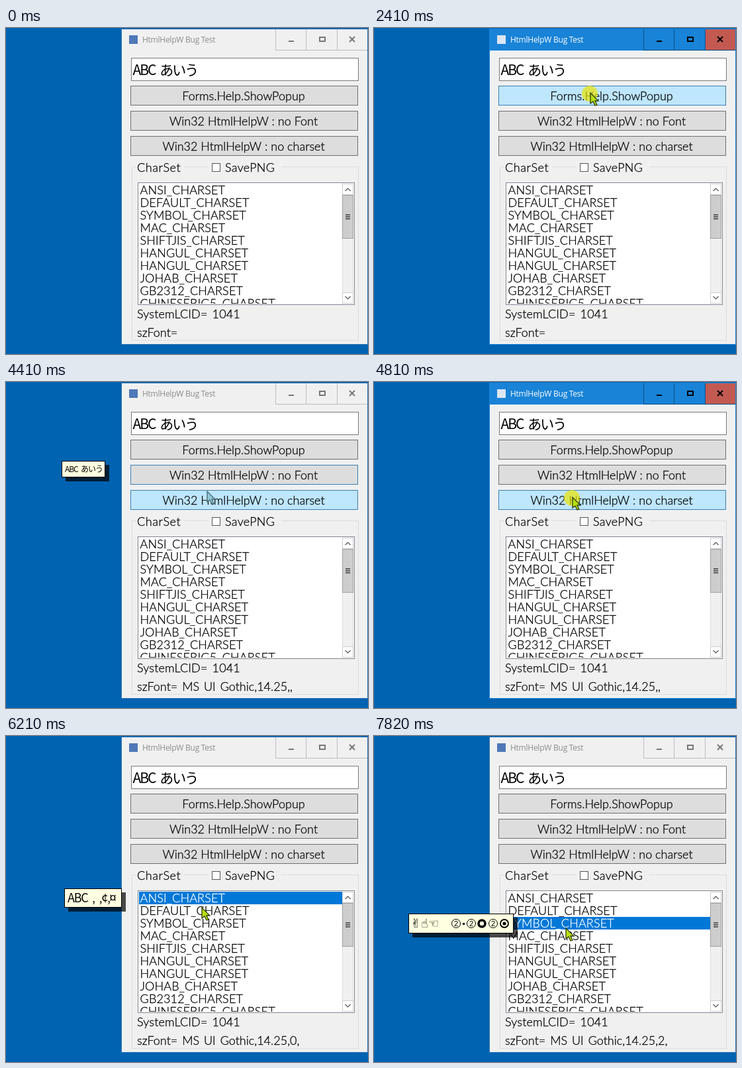
An HTML page with a canvas for the animation above (8 s loop, 547 by 492 pixels).

```html
<!DOCTYPE html>
<html lang="ja">
<head>
<meta charset="utf-8">
<title>HtmlHelpW Bug Test</title>
<style>
html, body { margin: 0; width: 100%; height: 100%; overflow: hidden; background: #0063b1 }
canvas { display: block }
</style>
</head>
<body>
<canvas id="stage" width="547" height="492"></canvas>
<script>
const ctx = document.getElementById('stage').getContext('2d');
const LOOP = 8000, TICK = 200;
const UI = '300 18px Lato, sans-serif';
const JP = size => `${size}px "Noto Sans CJK JP", "Noto Sans CJK", sans-serif`;
const SAMPLE = 'ABC あいう';
const CHARSETS = ['ANSI', 'DEFAULT', 'SYMBOL', 'MAC', 'SHIFTJIS', 'HANGUL', 'HANGUL', 'JOHAB', 'GB2312', 'CHINESEBIG5'];
const BUTTONS = ['Forms.Help.ShowPopup', 'Win32 HtmlHelpW : no Font', 'Win32 HtmlHelpW : no charset'];
const buttonY = i => 87 + 38 * i;
const rowY = i => 235 + 19 * i;

// Each click: its tick, its place, and the tick at which its popup opens
const CLICKS = [
  { at: 6, x: 314, y: 56, opens: Infinity },
  { at: 12, x: 327, y: 98, opens: 14, popup: () => smallPopup(187, buttonY(0) - 6) },
  { at: 18, x: 314, y: 138, opens: 18, popup: () => smallPopup(117, buttonY(1) - 6) },
  { at: 24, x: 300, y: 174, opens: 25, popup: () => largePopup(117.5, buttonY(2) - 6) },
  { at: 28, x: 298, y: 243, opens: 29, popup: () => largePopup(131.5, rowY(0) - 5, 'ABC ‚\u00a0‚¢‚¤', 87) },
  { at: 32, x: 296, y: 259, opens: 33, popup: () => largePopup(131.5, rowY(1) - 5) },
  { at: 38, x: 290, y: 290, opens: 38, popup: () => symbolPopup(131.5, rowY(2) - 5) }
];
const ENTRY = { at: 0, x: 424, y: 455 };
const FIRST_BUTTON = 1, FIRST_ROW = FIRST_BUTTON + BUTTONS.length;

function rect(x, y, w, h, fill, stroke) {
  ctx.fillStyle = fill;
  ctx.fillRect(x, y, w, h);
  if (stroke) {
    ctx.strokeStyle = stroke;
    ctx.lineWidth = 1;
    ctx.strokeRect(x + .5, y + .5, w - 1, h - 1);
  }
}

function line(color, width, ...pts) {
  ctx.strokeStyle = color;
  ctx.lineWidth = width;
  ctx.beginPath();
  pts.forEach(([x, y]) => ctx.lineTo(x, y));
  ctx.stroke();
}

function text(s, x, y, { font = UI, color = '#000', align = 'left', track = 0, gap = 0 } = {}) {
  ctx.font = font;
  ctx.fillStyle = ctx.strokeStyle = color;
  ctx.textAlign = align;
  ctx.letterSpacing = track + 'px';
  ctx.wordSpacing = gap + 'px';
  ctx.fillText(s, x, y);
  if (font === UI) {
    // Darken the thin interface strokes
    ctx.lineWidth = .3;
    ctx.strokeText(s, x, y);
  }
}

const checker = (() => {
  const tile = document.createElement('canvas');
  tile.width = tile.height = 2;
  const c = tile.getContext('2d');
  c.fillRect(0, 0, 1, 1);
  c.fillRect(1, 1, 1, 1);
  return ctx.createPattern(tile, 'repeat');
})();

function titleBar(active) {
  if (active) rect(175, 2, 371, 32, '#1883d7');
  rect(186, 11, 13, 13, active ? '#dce6f0' : '#4f78b8');
  text('HtmlHelpW Bug Test', 206, 22, { font: '12px "Open Sans", sans-serif', color: active ? '#fff' : '#8c8c8c', track: -.25 });
  const edge = active ? '#0b4f86' : '#bcbcbc', ink = active ? '#000' : '#777';
  if (active) rect(500, 2, 46, 31, '#c35a52');
  line(edge, 1, [407.5, 2], [407.5, 33.5], [546, 33.5]);
  for (const x of [453.5, 500.5]) line(edge, 1, [x, 2], [x, 33]);
  line(ink, 2, [427, 20], [435, 20]);
  ctx.strokeRect(474, 14, 8, 6);
  line(ink, 2, [519, 13], [527, 21]);
  line(ink, 2, [527, 13], [519, 21]);
}

function scrollBar() {
  rect(508, 235, 17, 181, '#f0f0f0', '#dcdcdc');
  rect(508, 235, 17, 17, '#fff', '#cdcdcd');
  rect(508, 399, 17, 17, '#fff', '#cdcdcd');
  rect(508, 252, 17, 66, '#cdcdcd', '#a0a0a0');
  for (let i = 0; i < 3; i++) rect(513, 281 + 3 * i, 7, 2, '#606060');
  for (const [y, dir] of [[244, 1], [407, -1]]) {
    line('#555', 1.2, [512.5, y + 2 * dir], [516.5, y - 2 * dir], [520.5, y + 2 * dir]);
  }
}

function listBox(selected) {
  rect(199, 233, 328, 185, '#fff', '#828790');
  ctx.save();
  ctx.beginPath();
  ctx.rect(201, 235, 307, 181);
  ctx.clip();
  CHARSETS.forEach((name, i) => {
    const on = i === selected;
    if (on) rect(201, rowY(i), 307, 19, '#0078d7');
    text(name + '_CHARSET', 202.5, rowY(i) + 16, { color: on ? '#fff' : '#000', track: .15 });
  });
  ctx.restore();
  scrollBar();
}

function formWindow(k, current, mouse) {
  const active = current >= 0 && k < CLICKS[current].opens;
  rect(174, 1, 373, 477, '#f0f0f0', active ? '#1883d7' : '#2a72b4');
  titleBar(active);

  const over = (y, h) => mouse && mouse.y >= y && mouse.y < y + h;
  rect(189, 45, 344, 35, '#fff', over(45, 35) ? '#2a9fd8' : '#7a7a7a');
  text(SAMPLE, 191.5, 71, { font: JP(21), track: -2, gap: 4 });

  BUTTONS.forEach((label, i) => {
    const y = buttonY(i), lit = over(y, 30), focused = i === current - FIRST_BUTTON;
    rect(188, y, 344, 30, lit ? '#bee6fd' : '#ddd', lit || focused ? '#3c7fb1' : '#707070');
    text(label, 359, y + 22, { align: 'center' });
  });

  ctx.strokeStyle = '#dcdcdc';
  ctx.lineWidth = 1;
  ctx.strokeRect(190.5, 209.5, 342, 262);
  rect(196, 203, 73, 14, '#f0f0f0');
  rect(305, 203, 111, 14, '#f0f0f0');
  text('CharSet', 198, 217, { track: .6 });
  rect(311, 204, 13, 13, '#fff', '#555');
  text('SavePNG', 331, 217, { track: .3 });

  listBox(current - FIRST_ROW);
  text('SystemLCID= 1041', 198, 438, { gap: 2, track: .15 });
  const shown = CLICKS.findLastIndex(c => c.opens <= k);
  const charset = shown >= FIRST_ROW ? shown - FIRST_ROW : '';
  const fontName = shown > FIRST_BUTTON ? ` MS UI Gothic,14.25,${charset},` : '';
  text('szFont=' + fontName, 198, 466, { gap: 2 });
}

function balloon(x, y, w, h) {
  rect(x + 6, y + 6, w, h, 'rgba(0,0,0,.4)');
  rect(x + 6, y + 6, w, h, checker);
  rect(x, y, w, h, '#ffffe1', '#000');
}

function smallPopup(cx, y) {
  const x = cx - 33;
  balloon(x, y, 66, 25);
  text(SAMPLE, x + 5, y + 17, { font: JP(12), track: -1.1, gap: 3 });
}

function largePopup(cx, y, s = SAMPLE, w = 97) {
  const x = Math.floor(cx - w / 2);
  balloon(x, y, w, 29);
  text(s, x + 5, y + 21, { font: '300 ' + JP(18), track: -1.3, gap: 4 });
}

function ring(x, y, r, width) {
  ctx.strokeStyle = '#000';
  ctx.lineWidth = width;
  ctx.beginPath();
  ctx.arc(x, y, r, 0, 7);
  ctx.stroke();
}

function symbolPopup(cx, y) {
  const x = cx - 79.5;
  balloon(x, y, 159, 30);
  const font = '18px "DejaVu Sans", sans-serif';
  [...'✌☝☜'].forEach((c, i) => text(c, x + 11 + 13.5 * i, y + 21, { font, align: 'center' }));
  for (const dx of [72, 95, 128]) {
    ring(x + dx, y + 15, 6.5, 1);
    text('2', x + dx, y + 19, { font: '11px "Liberation Sans", sans-serif', align: 'center' });
  }
  rect(x + 82, y + 14, 3, 3, '#000');
  ring(x + 111, y + 15, 5, 3.5);
  ring(x + 145, y + 15, 6, 1.8);
  ring(x + 145, y + 15, 1.3, 2.6);
}

// The pointer rests for a tick after a click and arrives a tick before the next
function pointerAt(k, current) {
  const from = CLICKS[current] || ENTRY, to = CLICKS[current + 1] || from;
  const start = from.at + 1, end = to.at - 1;
  const u = end > start ? Math.min(1, Math.max(0, (k - start) / (end - start))) : 0;
  const mix = (a, b) => Math.round(a + (b - a) * u);
  return { x: mix(from.x, to.x), y: mix(from.y, to.y) };
}

function iBeam(x, y) {
  for (const [color, width, d] of [['#111', 4, 1], ['#b4c800', 1.6, 0]]) {
    line(color, width, [x, y - 7 - d], [x, y + 7 + d]);
    for (const dy of [-7, 7]) line(color, width, [x - 4 - d, y + dy], [x + 4 + d, y + dy]);
  }
}

function arrow(x, y, fill, edge) {
  ctx.beginPath();
  for (const [dx, dy] of [[0, 0], [0, 16], [4, 13], [7, 19], [10, 18], [7, 12], [12, 12]]) ctx.lineTo(x + dx, y + dy);
  ctx.closePath();
  ctx.fillStyle = fill;
  ctx.fill();
  ctx.strokeStyle = edge;
  ctx.lineWidth = 1.3;
  ctx.stroke();
}

function pointer({ x, y }, pressed, faded) {
  if (pressed) {
    ctx.fillStyle = 'rgba(232,228,0,.7)';
    ctx.beginPath();
    ctx.arc(x - 1, y + 1, 12, 0, 7);
    ctx.fill();
  }
  if (y > 45 && y < 80) iBeam(x, y + 1);
  else if (faded) arrow(x, y, '#94c8d8', '#426874');
  else arrow(x, y, '#b9e010', '#2c3a10');
}

function draw(now) {
  const k = Math.floor(now % LOOP / TICK);
  const current = CLICKS.findLastIndex(c => c.at <= k);
  const click = CLICKS[current];
  const mouse = k > 0 ? pointerAt(k, current) : null;
  rect(0, 0, 547, 492, '#0063b1');
  formWindow(k, current, mouse);
  if (click && k >= click.opens) click.popup();
  if (mouse) {
    const hold = click ? Math.min(2, Math.max(1, click.opens - click.at)) : 0;
    const pressed = click && k < click.at + hold;
    pointer(mouse, pressed, !pressed && current === FIRST_BUTTON + 1);
  }
  requestAnimationFrame(draw);
}
requestAnimationFrame(draw);
</script>
</body>
</html>
```
